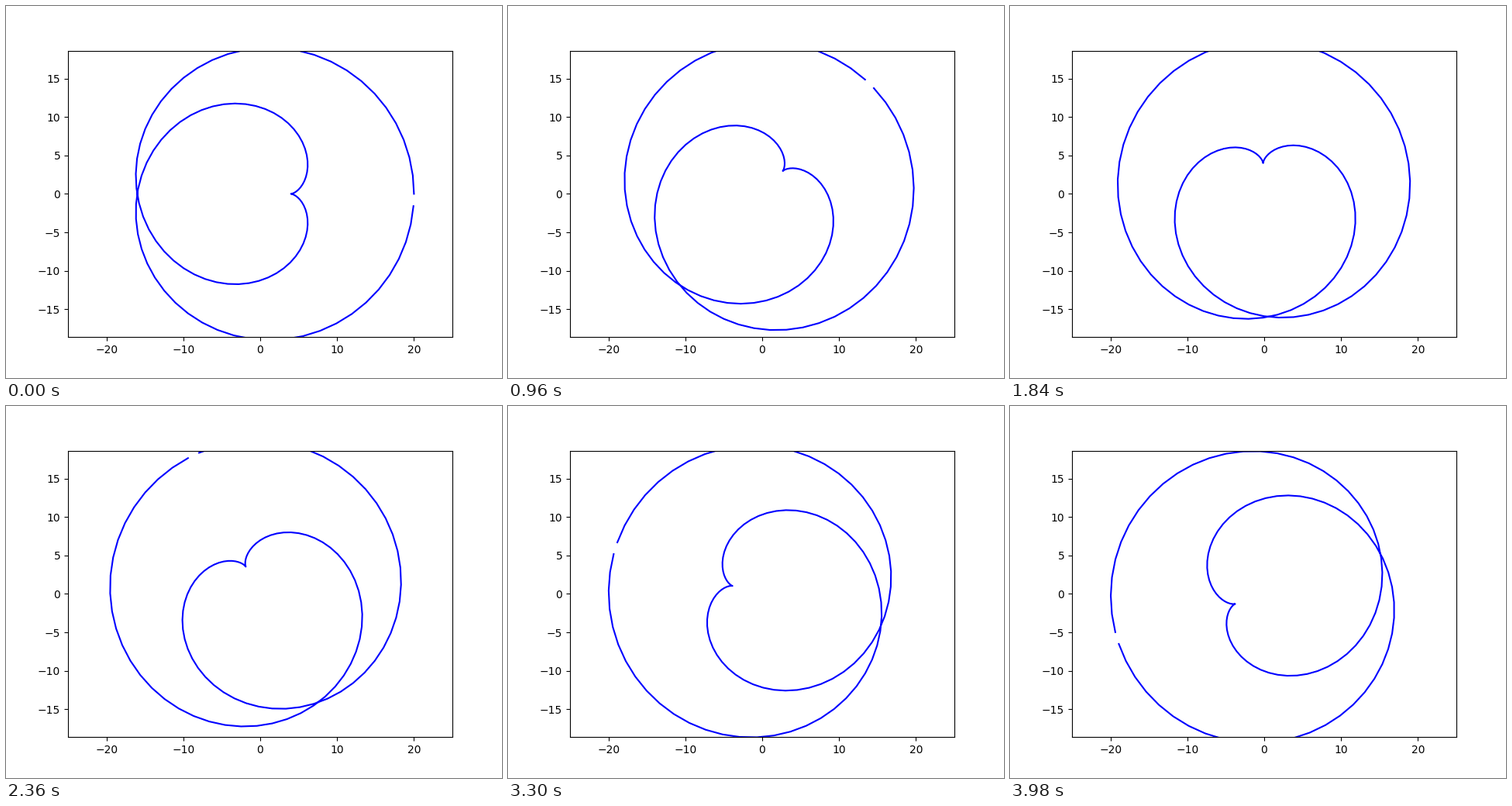
A matplotlib script for the animation above (4000 ms loop, 640 by 480 pixels).

```python
import numpy as np
import matplotlib.pyplot as plt
from matplotlib.animation import FuncAnimation

FRAMES = 200
INTERVAL = 20  # ms
R, r = 4, 8    # fixed and rolling circle radii

fig, ax = plt.subplots(figsize=(6.4, 4.8), dpi=100)
ax.set_aspect("equal", adjustable="datalim")
ax.set_xlim(-25, 25)
half_height = 25 * (0.77 * 4.8) / (0.775 * 6.4)
ax.set_ylim(-half_height, half_height)

# Epicycloid with one and a half turns of the rolling circle per lap
t = np.arange(0, 4 * np.pi, 0.1)
curve = (R + r) * np.exp(1j * t) + r * np.exp(1j * t * (R + r) / r)

line, = ax.plot([], [], color="blue", lw=1.5)


def update(i):
    z = curve * np.exp(1j * np.radians(i))  # one degree per step
    line.set_data(z.real, z.imag)
    return line,


anim = FuncAnimation(fig, update, frames=FRAMES, interval=INTERVAL,
                     repeat=True, repeat_delay=0)
plt.show()
```
